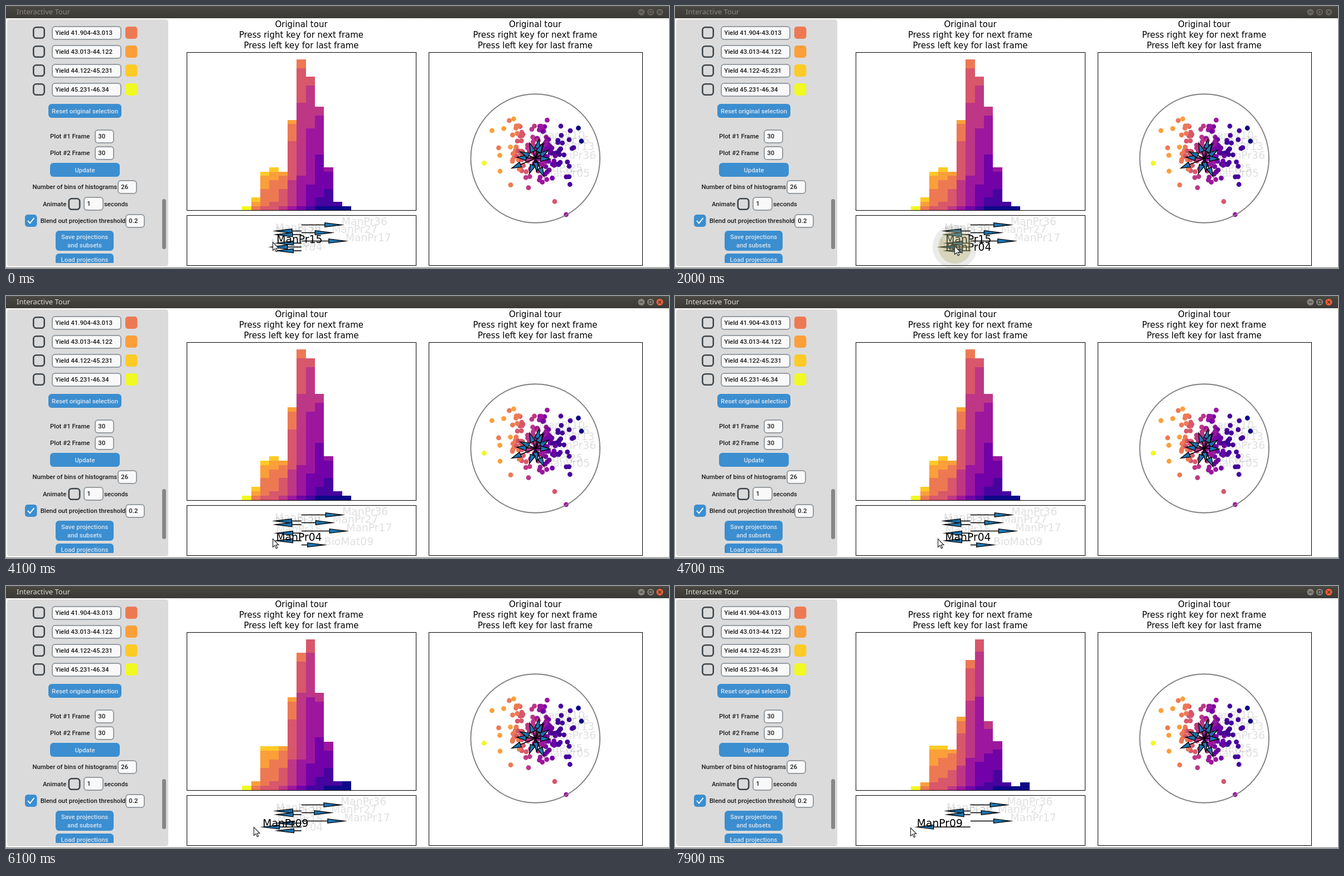
Animation of 1189x471 px, one loop 8 s. Source, as an HTML page with a canvas:

```html
<!DOCTYPE html>
<html lang="en">
<head>
<meta charset="utf-8">
<title>Interactive Tour</title>
<style>
  html, body { margin: 0; width: 100%; height: 100%; overflow: hidden; background: #fff; }
  canvas { display: block; }
</style>
</head>
<body>
<canvas id="stage" width="1189" height="471"></canvas>
<script>
const ctx = document.getElementById('stage').getContext('2d');
const LOOP = 8000, STEP = 100;
const PLASMA = ['#0d0887', '#46039f', '#7201a8', '#9c179e', '#bd3786',
                '#d8576b', '#ed7953', '#fb9f3a', '#fdca26', '#f0f921'];
const UI = '500 11.35px Roboto, sans-serif';
const PLOT = '15px "DejaVu Sans", sans-serif';
const LABEL = '18.75px "DejaVu Sans", sans-serif';
const BLUE = '#3b8ed0', FAINT = 'rgba(0,0,0,0.12)';

// Bin totals before, halfway and after the drag; BLEND moves through them.
const PROFILES = [
  [1, 3, 9, 10, 9, 21, 35, 31, 24, 10, 2, 1, 0],
  [1, 2, 10, 10, 10, 21, 31, 34, 22, 11, 2, 2, 0],
  [1, 2, 11, 11, 10, 18, 32, 37, 17, 12, 2, 1, 2]
];
const BLEND = [[0, 0], [3100, 0.2], [4900, 0.4], [5800, 1], [6700, 1.4], [7300, 2]];
// Mean colour class along the bins.
const CLASS_MEAN = [[0, 9], [1, 6.7], [3, 6.1], [5, 4.9], [12, -0.9]];

// Keys: time, then values.
const CURSOR = [[200,478,424], [300,488,430], [600,488,430], [800,496,429], [900,496,429],
  [1200,501,431], [2600,501,431], [2900,493,434], [4100,478,436], [5400,463,436],
  [6100,444,433], [6400,444,433], [7900,422,434]];
const SCALE = [[3000,1], [3100,1.018], [4700,1.02], [4900,1.004],
  [5400,1], [6100,0.975], [7900,0.908]];
const DRAGGED = [[3000,55], [3100,40], [4800,40], [4900,57], [5400,59.5],
  [6100,69.5], [6600,70], [7900,96]];

// Projection rows: label, baseline, signed length, spans with dark label.
const ROWS = [
  ['ManPr36', 393.5, 72, []],
  ['ManPr30', 404.5, -47, []],
  ['ManPr27', 407.5, 54.5, []],
  ['ManPr28', 411, -46, []],
  ['ManPr17', 422.5, 79, []],
  ['ManPr15', 426.3, -44.5, [[0, 3100]]],
  ['ManPr09', 433.3, 0, [[500, 1100], [4900, LOOP]]],
  ['ManPr04', 440, -44.5, [[1400, 5800]]],
  ['BioMat09', 447.5, 40.2, []]
];
const MIN_LENGTH = 40.8;

// Scatter: points far from the cloud, and labelled arrow tips.
const OUTLIERS = [[857.5,282.5,9], [871.5,224,7], [910.5,203,7], [902.5,206,6], [914.5,219.5,6],
  [883.5,255,6], [886,297,7], [984,351.5,5], [1004.5,375,3], [995,216,1], [1026.5,219.5,0],
  [1032,243,0]];
const TIPS = [['ManPr10',956,239], ['ManPr16',964,248], ['ManPr13',973,259],
  ['ManPr36',976,275], ['ManPr25',952,298], ['ManPr05',965,307], ['ManPr09',916,272]];

function random(seed) {
  return () => (seed = (seed * 16807) % 2147483647) / 2147483647;
}

function cloud(n) {
  const rnd = random(4127), bell = () => rnd() + rnd() + rnd() - 1.5;
  return Array.from({ length: n }, () => {
    const dx = bell() * 56, dy = bell() * 54 + dx * 0.2;
    const cls = Math.round(3.5 - dx / 17 + (rnd() - 0.5) * 0.8);
    return [952 + dx, 270 + dy, Math.max(1, Math.min(7, cls))];
  });
}
const DOTS = cloud(142).concat(OUTLIERS);

function at(keys, t) {
  if (t <= keys[0][0]) return keys[0].slice(1);
  for (let i = 1; i < keys.length; i++) {
    const a = keys[i - 1], b = keys[i];
    if (t <= b[0]) {
      const k = (t - a[0]) / (b[0] - a[0]);
      return a.slice(1).map((v, j) => v + (b[j + 1] - v) * k);
    }
  }
  return keys[keys.length - 1].slice(1);
}

const held = (keys, t) => keys.filter(k => t >= k[0]).pop()[1];

function text(str, x, y, font, color, align = 'left') {
  ctx.font = font;
  ctx.fillStyle = color;
  ctx.textAlign = align;
  ctx.fillText(str, x, y);
}

function disc(x, y, r, color) {
  ctx.fillStyle = color;
  ctx.beginPath();
  ctx.arc(x, y, r, 0, Math.PI * 2);
  ctx.fill();
}

function box(x, y, w, h, r, fill, stroke, lw = 2) {
  const d = stroke ? lw / 2 : 0;
  ctx.beginPath();
  ctx.roundRect(x + d, y + d, w - 2 * d, h - 2 * d, r);
  if (fill) { ctx.fillStyle = fill; ctx.fill(); }
  if (stroke) { ctx.strokeStyle = stroke; ctx.lineWidth = lw; ctx.stroke(); }
}

function path(points, close) {
  ctx.beginPath();
  points.forEach(([x, y], i) => i ? ctx.lineTo(x, y) : ctx.moveTo(x, y));
  if (close) ctx.closePath();
}

function titleBar(active) {
  const g = ctx.createLinearGradient(0, 0, 0, 22);
  g.addColorStop(0, '#504f49');
  g.addColorStop(0.15, '#45443f');
  g.addColorStop(1, '#3b3a36');
  ctx.fillStyle = g;
  ctx.fillRect(0, 0, 1189, 22);
  text('Interactive Tour', 19, 15.3, '500 13px "Noto Sans", sans-serif', active ? '#dfdbd2' : '#8b8880');
  const face = active ? '#85827a' : '#66645d';
  [1139.5, 1156, 1172.5].forEach((x, i) => {
    disc(x, 11, 7, '#33322e');
    disc(x, 11, 6.2, active && i === 2 ? '#ee5f38' : face);
    ctx.strokeStyle = '#3c3b37';
    ctx.lineWidth = 1.3;
    ctx.beginPath();
    if (i === 0) { ctx.moveTo(x - 3, 11); ctx.lineTo(x + 3, 11); }
    if (i === 1) ctx.rect(x - 2.5, 8.5, 5, 5);
    if (i === 2) {
      ctx.moveTo(x - 2.5, 8.5); ctx.lineTo(x + 2.5, 13.5);
      ctx.moveTo(x + 2.5, 8.5); ctx.lineTo(x - 2.5, 13.5);
    }
    ctx.stroke();
  });
}

const uiText = (s, x, mid) => text(s, x, mid + 4, UI, '#1c1c1c');

function entry(str, x, y, w) {
  box(x, y, w, 25, 5, '#f9f9fa', '#979da2');
  uiText(str, x + 6.3, y + 12);
}

function button(lines, x, y, w, h) {
  box(x, y, w, h, 6, BLUE);
  const mid = y + h / 2;
  lines.forEach((s, i) =>
    text(s, x + w / 2, mid + 4 + (i - (lines.length - 1) / 2) * 15, UI, '#dce4ee', 'center'));
}

const checkbox = (x, y) => box(x, y, 22, 22, 5, null, '#3e454a', 2.6);

function panel() {
  box(2, 24, 289, 444, 5, '#dbdbdb');
  ['41.904-43.013', '43.013-44.122', '44.122-45.231', '45.231-46.34'].forEach((range, i) => {
    const y = 36 + i * 34;
    checkbox(48, y + 1);
    entry('Yield ' + range, 82, y, 125);
    box(214, y + 1, 21.5, 22, 5, PLASMA[6 + i]);
  });
  button(['Reset original selection'], 76, 176, 131, 25);
  uiText('Plot #1 Frame', 79, 234);
  entry('30', 159, 222, 35);
  uiText('Plot #2 Frame', 79, 264);
  entry('30', 159, 252, 35);
  button(['Update'], 79, 282, 125, 25);
  uiText('Number of bins of histograms', 47.5, 325);
  entry('26', 200, 313, 35);
  uiText('Animate', 66, 355.5);
  checkbox(111.5, 345);
  entry('1', 139, 343, 36);
  uiText('seconds', 176, 355.5);
  box(34, 375, 21.5, 22, 5, BLUE);
  path([[39, 386], [43, 390.5], [50.5, 381]]);
  ctx.strokeStyle = '#fff';
  ctx.lineWidth = 2;
  ctx.stroke();
  uiText('Blend out projection threshold', 61.7, 386);
  entry('0.2', 214, 374, 35);
  button(['Save projections', 'and subsets'], 89, 404, 104, 36);
  ctx.save();
  ctx.beginPath();
  ctx.rect(80, 440, 130, 22);
  ctx.clip();
  button(['Load projections'], 89, 445, 104, 21);
  ctx.restore();
  box(280, 347, 7, 90, 3.5, '#878787');
}

function axes(x, y, w, h) {
  ctx.strokeStyle = '#000';
  ctx.lineWidth = 1;
  ctx.strokeRect(x + 0.5, y + 0.5, w, h);
}

function heading(x) {
  ['Original tour', 'Press right key for next frame', 'Press left key for last frame']
    .forEach((s, i) => text(s, x, 38.3 + i * 18.8, PLOT, '#000', 'center'));
}

// Share of a bin at or below a colour class.
function share(cls, mean) {
  return cls === 9 ? 1 : 1 / (1 + Math.exp(-2 * (cls + 0.5 - mean)));
}

function histogram(t) {
  const k = held(BLEND, t), from = Math.min(1, Math.floor(k));
  const totals = PROFILES[from].map((n, i) =>
    Math.round(n + (PROFILES[from + 1][i] - n) * (k - from)));
  const unit = 271 / Math.max(...totals);
  const edge = i => Math.round(423.2 + 16.35 * i);
  const level = n => Math.round(367.3 - n * unit);
  totals.forEach((total, i) => {
    const mean = at(CLASS_MEAN, i)[0];
    let low = 0;
    PLASMA.forEach((color, cls) => {
      const high = Math.round(total * share(cls, mean));
      ctx.fillStyle = color;
      ctx.fillRect(edge(i), level(high), edge(i + 1) - edge(i), level(low) - level(high));
      low = high;
    });
  });
  axes(324, 83, 411, 284);
}

function arrow(x0, y0, x1, y1, head, half) {
  const a = Math.atan2(y1 - y0, x1 - x0), c = Math.cos(a), s = Math.sin(a);
  const bx = x1 - head * c, by = y1 - head * s;
  ctx.strokeStyle = '#000';
  ctx.fillStyle = '#1f77b4';
  ctx.lineWidth = 1.6;
  path([[x0, y0], [bx, by]]);
  ctx.stroke();
  ctx.lineWidth = 1.3;
  path([[x1, y1], [bx - half * s, by + half * c], [bx + half * s, by - half * c]], true);
  ctx.fill();
  ctx.stroke();
}

function projection(t) {
  const scale = at(SCALE, t)[0], drag = at(DRAGGED, t)[0];
  const rows = ROWS.map(([name, y, len, dark]) => ({
    name, y,
    len: name === 'ManPr09' ? -drag : len * scale,
    dark: dark.some(([a, b]) => t >= a && t < b)
  })).filter(r => Math.abs(r.len) >= MIN_LENGTH);
  rows.forEach(r => arrow(529.8, r.y, 529.8 + r.len, r.y, 30, 3.8));
  rows.forEach(r => text(r.name, 529.8 + r.len, r.y, LABEL, r.dark ? '#000' : FAINT));
  axes(324, 376, 411, 90);
}

function scatter() {
  DOTS.forEach(([x, y, c]) => disc(x, y, 4.4, PLASMA[c]));
  ctx.strokeStyle = '#808080';
  ctx.lineWidth = 1.9;
  ctx.beginPath();
  ctx.arc(949.3, 274, 115.8, 0, Math.PI * 2);
  ctx.stroke();
  const cx = 949.5, cy = 274;
  TIPS.forEach(([, x, y]) => arrow(cx, cy, x, y, 17, 4.8));
  for (let i = 0; i < 5; i++) {
    const a = 1.95 + i * 0.8, r = 30 + 16 * Math.sin(i * Math.PI / 2) ** 2 * (i < 2);
    arrow(cx, cy, cx + r * Math.cos(a), cy + r * Math.sin(a), 17, 4.8);
  }
  TIPS.forEach(([s, x, y]) => text(s, x, y, LABEL, FAINT));
  axes(758, 83, 383, 383);
}

function halo(t) {
  if (t < 1400 || t >= 2300) return;
  const k = Math.min(1, 0.4 + (t - 1400) / 1000);
  disc(502, 433, 40 * k, 'rgba(90,90,80,0.12)');
  disc(502, 433, 30 * k, 'rgba(178,172,105,0.36)');
}

function cursor(t) {
  const [x, y] = at(CURSOR, t);
  path([[0, 0], [0, 15], [3.5, 11.8], [6, 17.3], [8.3, 16.3], [5.9, 11], [10.5, 11]]
    .map(([dx, dy]) => [x + dx + 0.5, y + dy + 0.5]), true);
  ctx.fillStyle = '#f4f4f4';
  ctx.fill();
  ctx.strokeStyle = '#222';
  ctx.lineWidth = 1.1;
  ctx.stroke();
}

function draw(t) {
  ctx.fillStyle = '#fff';
  ctx.fillRect(0, 0, 1189, 471);
  titleBar(t >= 2700);
  panel();
  heading(529.5);
  heading(949);
  histogram(t);
  scatter();
  projection(t);
  ctx.fillStyle = '#777671';
  ctx.fillRect(0, 470, 1189, 1);
  halo(t);
  cursor(t);
}

const start = performance.now();
function tick() {
  const t = (performance.now() - start) % LOOP;
  draw(Math.floor(t / STEP) * STEP);
  requestAnimationFrame(tick);
}
tick();
</script>
</body>
</html>
```
